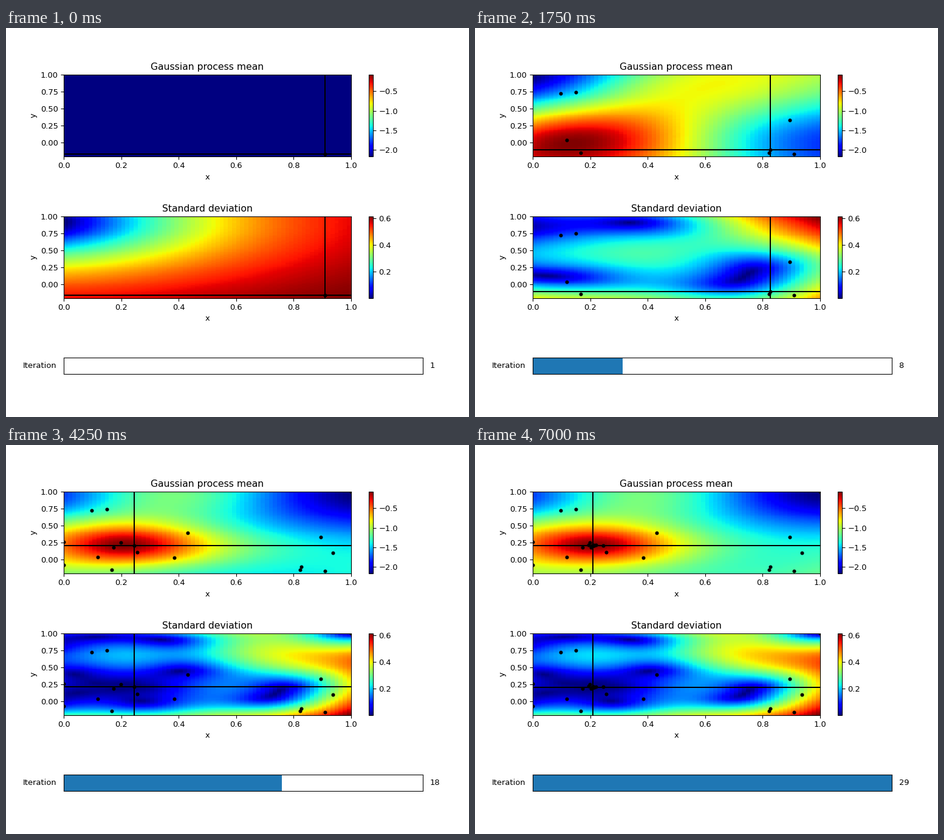
These frames come from a looping animation (762 by 642 pixels, 7.25 s). A matplotlib script:

```python
import numpy as np
import matplotlib.pyplot as plt
from matplotlib.animation import FuncAnimation
from matplotlib.cm import ScalarMappable
from matplotlib.colors import Normalize
from matplotlib.patches import Rectangle

STEPS = 29
CELLS = 70
JITTER = 1e-6
BEST = 0.21  # both coordinates of the optimum

plt.rcParams["font.size"] = 9.75

# Places tried before the search settles on the optimum.
EXPLORE = np.array([
    (0.909, -0.162), (0.166, -0.145), (0.895, 0.329), (0.117, 0.038),
    (0.149, 0.744), (0.096, 0.726), (0.823, -0.145), (0.828, -0.104),
    (1, 1), (0, 0.262), (0.937, 0.100), (0.431, 0.395),
    (0, -0.073), (0.256, 0.110), (0.384, 0.034),
])


def closing_spiral(count):
    k = np.arange(count)
    radius = 0.002 + 0.043 * np.exp(-(k / 4) ** 2)
    angle = np.radians(214 - 107 * k)
    return BEST + radius[:, None] * np.column_stack([np.cos(angle),
                                                     np.sin(angle)])


def objective(x, y):
    def hill(cx, cy, height, spread):
        return height * np.exp(-((x - cx) ** 2 + (y - cy) ** 2) / spread)

    peak = 0.65 / (1 + 12 * ((x - BEST) ** 2 + (y - BEST) ** 2))
    return (0.38 - 0.13 * y + peak
            + hill(0.95, 0.42, 0.11, 0.05)
            + hill(0.91, -0.16, -0.36, 0.086)
            + hill(1, 1, -0.29, 0.1))


points = np.vstack([EXPLORE, closing_spiral(STEPS - len(EXPLORE))])
values = objective(*points.T)


def matern(a, b, scale):
    d = np.sqrt(((a[:, None] - b[None]) ** 2).sum(axis=2))
    z = np.sqrt(5) * d / scale
    return (1 + z + z * z / 3) * np.exp(-z)


def posterior(n, query):
    scale = 0.5 + 0.5 * np.exp(-(n - 1) / 10)
    known, obs = points[:n], values[:n]
    cov = matern(known, known, scale) + JITTER * np.eye(n)
    cross = matern(known, query, scale)
    weights = np.linalg.solve(cov, cross)
    base = obs.mean()
    mean = base + (obs - base) @ weights
    var = 1 - (cross * weights).sum(axis=0)
    return mean, np.sqrt(np.maximum(var, 0))


fig = plt.figure(figsize=(762 / 96, 642 / 96), dpi=96, facecolor="white")
rows = fig.add_gridspec(3, 1, height_ratios=[5, 5, 1], hspace=1,
                        left=0.125, right=0.9, bottom=0.11, top=0.88)

x_edges = np.linspace(0, 1, CELLS + 1)
y_edges = np.linspace(-0.2, 1, CELLS + 1)
gx, gy = np.meshgrid(x_edges[:-1], y_edges[:-1])
# The surface is evaluated with its two inputs exchanged.
query = np.column_stack([gy.ravel(), gx.ravel()])


class Panel:
    def __init__(self, row, title, low, high, bar_ticks):
        ax = fig.add_subplot(rows[row])
        self.mesh = ax.pcolormesh(x_edges, y_edges, np.zeros(gx.shape),
                                  cmap="jet", shading="flat")
        self.hline = ax.axhline(0, color="black", lw=1.5)
        self.vline = ax.axvline(0, color="black", lw=1.5)
        self.dots, = ax.plot([], [], "o", color="black", ms=3.5, mew=1)
        ax.set(title=title, xlabel="x", ylabel="y", xlim=(0, 1),
               ylim=(-0.2, 1), yticks=np.arange(0, 1.1, 0.25))
        bar = ScalarMappable(Normalize(low, high), cmap="jet")
        fig.colorbar(bar, ax=ax, ticks=bar_ticks)

    def show(self, field, n):
        x, y = points[n - 1]
        self.mesh.set_array(field.reshape(gx.shape))
        self.mesh.set_clim(field.min(), field.max())
        self.hline.set_ydata([y, y])
        self.vline.set_xdata([x, x])
        self.dots.set_data(*points[:n].T)


panels = [
    Panel(0, "Gaussian process mean", -2.17, -0.075, [-2, -1.5, -1, -0.5]),
    Panel(1, "Standard deviation", 0.001, 0.6145, [0.2, 0.4, 0.6]),
]

slider = fig.add_subplot(rows[2])
slider.set(xlim=(1, STEPS), ylim=(0, 1), xticks=[], yticks=[])
fill = slider.add_patch(Rectangle((1, 0), 0, 1, facecolor="#1f77b4", lw=0))
slider.text(-0.02, 0.5, "Iteration", transform=slider.transAxes,
            ha="right", va="center")
counter = slider.text(1.02, 0.5, "1", transform=slider.transAxes,
                      ha="left", va="center")


def update(frame):
    n = frame + 1
    for panel, field in zip(panels, posterior(n, query)):
        panel.show(field, n)
    fill.set_width(n - 1)
    counter.set_text(str(n))
    return []


anim = FuncAnimation(fig, update, frames=STEPS, interval=250,
                     init_func=lambda: update(0), repeat=True)
plt.show()
```
